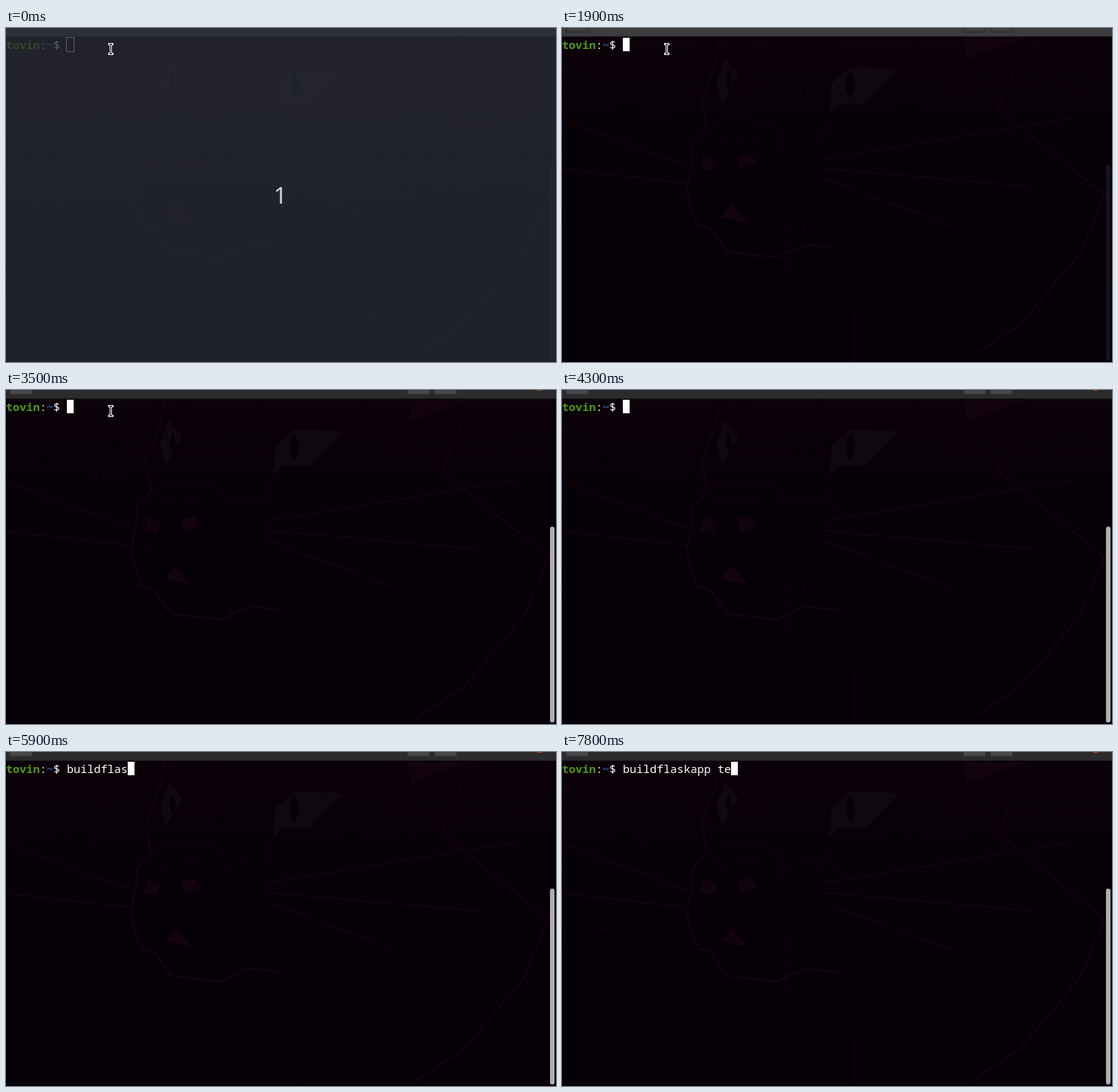
Recreate the animation shown at these times as an HTML page. Size 732 by 445 pixels, loop 8 s.

```html
<!DOCTYPE html>
<html lang="en">
<head>
<meta charset="utf-8">
<title>Terminal typing</title>
<style>
  html, body { margin: 0; width: 732px; height: 445px; overflow: hidden; background: #050006; }
  svg { display: block; }
  text { font: 15px "Noto Sans Mono", "DejaVu Sans Mono", monospace; white-space: pre; fill: #fff; }
  .bold { font-weight: 700; }
  .lines { fill: none; stroke: #12030c; stroke-width: 3; }
</style>
</head>
<body>
<svg width="732" height="445" viewBox="0 0 732 445">
  <defs>
    <linearGradient id="night" x2="0" y2="1">
      <stop offset="0" stop-color="#0c0209"/>
      <stop offset=".3" stop-color="#060007"/>
      <stop offset="1" stop-color="#040006"/>
    </linearGradient>
  </defs>
  <rect width="732" height="445" fill="url(#night)"/>

  <!-- faint wallpaper -->
  <g class="lines">
    <path d="M211 12L205 45 186 95 193 135 174 155 173 180 167 210 168 225 180 262 197 266 220 298 285 306 325 288 368 294"/>
    <path d="M620 12L580 108 722 222 690 300 610 395 545 438" stroke="#10030b"/>
    <path d="M0 122L175 187M0 188L167 207M345 175L680 120M345 187L630 212M347 200L520 264" stroke="#10020a"/>
    <path d="M18 239L167 223M90 265L170 233M110 288L175 245M330 222L400 293" stroke="#0c0209" stroke-width="2"/>
    <path d="M193 135L214 151 218 205M214 151L265 145 M193 135L215 122 265 123 292 137 295 152 283 175 255 188M295 152L350 141 375 168M355 114L350 141 322 190M297 240V325M319 232L326 308M175 187L190 220 200 190" stroke="#0d0209" stroke-width="2"/>
    <path d="M368 294L390 375V445M490 365L478 430M572 130L515 220M610 130L645 190M480 12L455 40M345 12L330 35M243 12L235 50" stroke="#0a0209" stroke-width="2"/>
    <path d="M17 102L185 70M112 118L350 77" stroke="#130b14" stroke-width="2" stroke-dasharray="2 6"/>
  </g>
  <path d="M535 14H617L538 42ZM188 168L208 178 200 190 184 188ZM233 172L252 168 260 180 238 190ZM225 233L248 260 212 252Z" fill="#13030c"/>
  <path d="M217 40L235 62 228 72 213 100 205 72ZM384 52L449 55 404 101H370L355 114 359 74Z" fill="#0f090f"/>
  <path d="M222 56q7 14 0 28q-7-14 0-28M384 58q12 18 0 36q-12-18 0-36" fill="#050006"/>

  <!-- window frame: unfocused, then focused on top -->
  <rect width="732" height="12" fill="#3c3b3d"/>
  <path d="M5.5-9.5h29v15h-29zM534.5-9.5h29v15h-29zM570.5-9.5h29v15h-29z" fill="none" stroke="#2b2a2c"/>
  <circle cx="710" cy="-8" r="9" fill="#65403c"/>
  <rect x="724" y="182" width="6" height="261" rx="3" fill="#17131a"/>
  <g id="focus">
    <rect width="732" height="12" fill="#2b2a2c"/>
    <path d="M6-9h28v14h-28zM535-9h28v14h-28zM571-9h28v14h-28z" fill="#474648" stroke="#474648" stroke-linejoin="round"/>
    <circle cx="710" cy="-8" r="9" fill="#d9531f"/>
    <rect x="724" y="182" width="6" height="261" rx="3" fill="#b1adb1"/>
  </g>
  <path d="M0 11.5H732" stroke="#1d1a1f"/>

  <text y="28"><tspan class="bold" fill="#4e9a06">tovin</tspan>:<tspan class="bold" fill="#3465a4">~</tspan>$</text>
  <text id="typed" x="81" y="28"></text>
  <rect id="hollow" x="80.5" y="12.5" width="10" height="19" fill="none" stroke="#fff"/>
  <rect id="block" y="13" width="9" height="18" fill="#fff"/>

  <g id="count">
    <rect width="732" height="445" fill="#292d38" opacity=".76"/>
    <text x="365" y="234" text-anchor="middle" style="font:31px 'Noto Sans','Open Sans',sans-serif;fill:#d2d3d5">1</text>
  </g>
  <g id="pointer" fill="none">
    <path id="beam" d="M137.5 21.5h4M139.5 21.5v13M137.5 34.5h4" stroke="#fff" stroke-width="3" stroke-linecap="square"/>
    <use href="#beam" style="display:none"/>
    <path d="M137.5 21.5h4M139.5 21.5v13M137.5 34.5h4" stroke="#000"/>
  </g>
</svg>
<script>
  const LOOP = 8000;
  const command = "buildflaskapp te";
  const keyTimes = [4600, 4700, 5000, 5100, 5400, 5500, 5600, 5700,
                    5900, 6000, 6400, 6500, 6900, 7000, 7600, 7800];
  const $ = id => document.getElementById(id);
  const show = (id, on) => $(id).setAttribute("visibility", on ? "visible" : "hidden");
  const within = (t, from, to) => t >= from && t < to;

  function draw(now) {
    const t = now % LOOP;
    const n = keyTimes.filter(k => k <= t).length;
    $("typed").textContent = command.slice(0, n);
    $("block").setAttribute("x", 81 + 9 * n);
    show("count", t < 100);
    show("hollow", t < 1900);
    show("block", within(t, 1900, 2500) || within(t, 3500, 3700) || t >= 4300);
    show("pointer", t < 3700);
    $("focus").setAttribute("opacity", t < 2000 ? 0 : t < 2100 ? 0.6 : 1);
    requestAnimationFrame(draw);
  }
  draw(performance.now());
</script>
</body>
</html>
```
